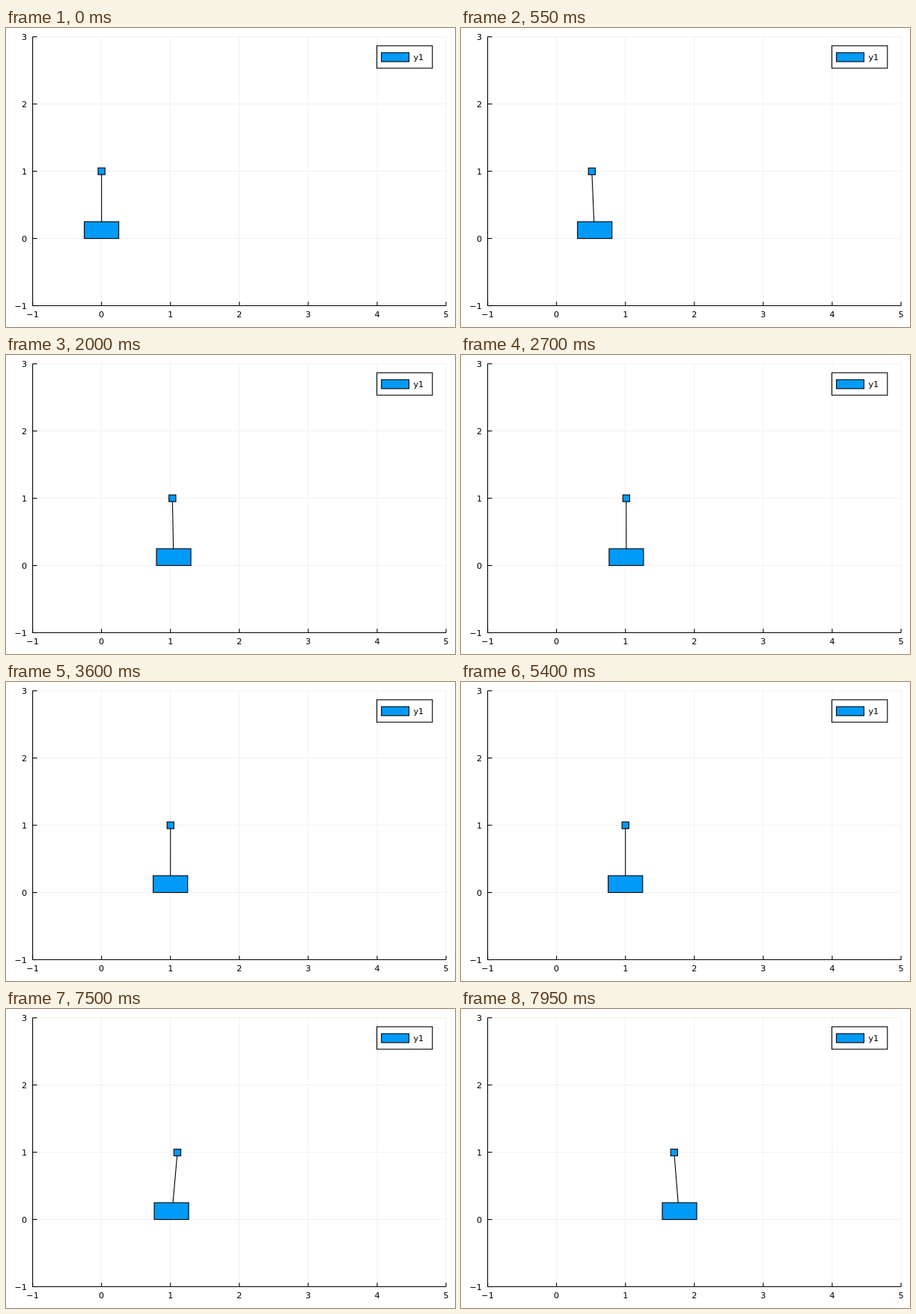
An HTML page for the animation above (8000 ms loop, 600 by 400 pixels).

```html
<!DOCTYPE html>
<html lang="en">
<head>
<meta charset="utf-8">
<title>Cart and pole</title>
<style>
  html, body { margin: 0; width: 100%; height: 100%; overflow: hidden; background: #fff; }
  svg { display: block; width: 600px; height: 400px; }
  text { font: 11.2px "DejaVu Sans", sans-serif; fill: #000; }
  .grid { stroke: #000; stroke-opacity: .1; stroke-width: .6; }
  .line { stroke: #000; stroke-width: 1.1; fill: none; }
  .shape { stroke: #000; stroke-width: 1.1; fill: #009af9; }
</style>
</head>
<body>
<svg id="stage" viewBox="0 0 600 400"></svg>
<script>
const stage = document.getElementById('stage');
const FRAME = 50, LOOP = 8000, STEP_FRAME = 140;
const UNIT_X = 92.08, UNIT_Y = 89.95;
const px = x => 127.67 + x * UNIT_X;
const py = y => 281.6 - y * UNIT_Y;

function add(tag, attrs, text) {
  const el = document.createElementNS('http://www.w3.org/2000/svg', tag);
  set(el, attrs);
  if (text !== undefined) el.textContent = text;
  return stage.appendChild(el);
}
function set(el, attrs) {
  for (const key in attrs) el.setAttribute(key, attrs[key]);
}
const line = (cls, x1, y1, x2, y2) => add('line', { class: cls, x1, y1, x2, y2 });
const box = (cls, x, y, width, height) => add('rect', { class: cls, x, y, width, height });
const label = v => String(v).replace('-', '\u2212');

function drawAxes() {
  const left = px(-1), right = px(5), top = py(3), bottom = py(-1);
  for (let v = -1; v <= 5; v++) {
    line('grid', px(v), top, px(v), bottom);
    line('line', px(v), bottom, px(v), bottom - 5.4);
    add('text', { x: px(v), y: 387, 'text-anchor': 'middle' }, label(v));
  }
  for (let v = -1; v <= 3; v++) {
    line('grid', left, py(v), right, py(v));
    line('line', left, py(v), left + 6, py(v));
    add('text', { x: 28, y: py(v) + 4.1, 'text-anchor': 'end' }, label(v));
  }
  line('line', left, top, left, bottom);
  line('line', left, bottom, right, bottom);
}

function drawLegend() {
  box('line', 495.6, 23.8, 74.2, 30);
  box('shape', 501.7, 33, 36.8, 12);
  add('text', { x: 544.5, y: 43 }, 'y1');
}

// Characteristic polynomial, lowest order first, of the poles -sigma±i·omega, -r, -f.
function polynomial(sigma, omega, r, f) {
  const b1 = 2 * sigma, b0 = sigma ** 2 + omega ** 2, c1 = r + f, c0 = r * f;
  return [b0 * c0, b0 * c1 + b1 * c0, b0 + b1 * c1 + c0, b1 + c1];
}

// Closed-loop response of the pole's flat output; returns cart offset and tilt per frame.
function simulate(poly, start, zero, frames) {
  const dt = 0.0005, perFrame = FRAME / 1000 / dt;
  let e = start.slice();
  const rate = s => [s[1], s[2], s[3], -poly.reduce((sum, a, i) => sum + a * s[i], 0)];
  const states = [];
  for (let n = 0; n < frames; n++) {
    const lead = e[2] / zero;
    states.push({ x: e[0] - lead, tilt: 0.45 * lead });
    for (let i = 0; i < perFrame; i++) {
      const k = rate(e);
      const mid = rate(e.map((v, j) => v + k[j] * dt / 2));
      e = e.map((v, j) => v + mid[j] * dt);
    }
  }
  return states;
}

const offset = (states, target) => states.map(s => ({ x: target + s.x, tilt: s.tilt }));
const frames = [
  ...offset(simulate(polynomial(1.79, 1.32, 6.6, 19), [-1, 0.78, 0, 0], 4.45, STEP_FRAME), 1),
  ...offset(simulate(polynomial(2.3, 1.2, 6, 20), [-1.02, 0, 0, 0], 5, LOOP / FRAME - STEP_FRAME), 2.02)
];

drawAxes();
const pole = line('line', 0, 0, 0, 0);
const cart = box('shape', 0, py(0.25), UNIT_X / 2, UNIT_Y / 4);
const bob = box('shape', 0, 0, UNIT_X / 10, UNIT_Y / 10);
drawLegend();

function render(ms) {
  const { x, tilt } = frames[Math.floor((ms % LOOP) / FRAME)];
  const tipX = x + Math.sin(tilt), tipY = Math.cos(tilt);
  set(pole, { x1: px(x), y1: py(0), x2: px(tipX), y2: py(tipY) });
  set(cart, { x: px(x - 0.25) });
  set(bob, { x: px(tipX - 0.05), y: py(tipY + 0.05) });
}

const begin = performance.now();
function tick() {
  render(performance.now() - begin);
  requestAnimationFrame(tick);
}
tick();
</script>
</body>
</html>
```
